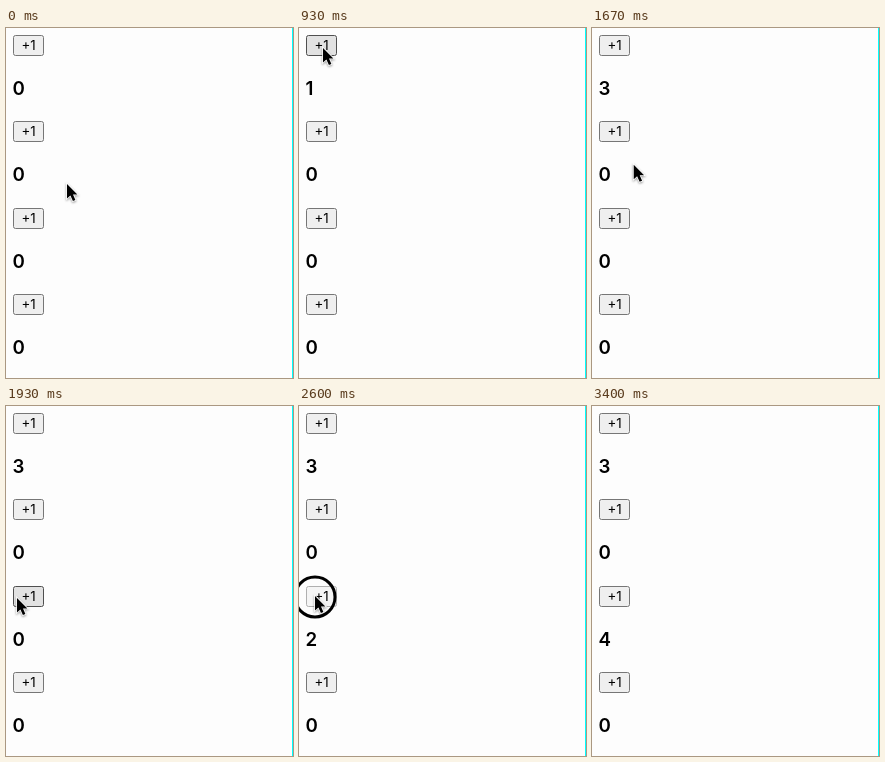
Recreate the animation shown at these times as an HTML page. Size 287x350 px, loop 3.54 s.

```html
<!DOCTYPE html>
<html lang="en">
<head>
<meta charset="utf-8">
<title>Counters</title>
<style>
  html, body { margin: 0; width: 100%; height: 100%; overflow: hidden; background: #fdfdfd; }
  svg { display: block; width: 287px; height: 350px; font-family: Inter, Roboto, sans-serif; }
  .button rect { fill: #efefef; stroke: #767676; }
  .button.hover rect { fill: #e2e2e2; stroke: #4f4f4f; }
  .button.active rect { fill: #f5f5f5; stroke: #b0b0b0; }
  .button text { font-size: 13.33px; text-anchor: middle; }
  .count { font-size: 18.72px; font-weight: 600; }
  #ring { fill: none; stroke: #000; stroke-width: 3; }
  #cursor { filter: drop-shadow(0.5px 1px 1px rgba(0, 0, 0, .4)); }
</style>
</head>
<body>
<svg viewBox="0 0 287 350">
  <rect x="286" width="1" height="350" fill="#0ff"/>
  <g id="rows"></g>
  <circle id="ring" r="20"/>
  <path id="cursor" d="M0 0V14.5L3.4 11.4L5.9 17L8.4 16L6 10.4H10.4Z"
    stroke="#fff" stroke-width="1.6" paint-order="stroke"/>
</svg>
<script>
const LOOP = 3540, STEP = 200 / 3;
const tops = [7, 93, 180, 266];
const $ = id => document.getElementById(id);

$("rows").innerHTML = tops.map(y => `
  <g class="button">
    <rect x="7.5" y="${y + .5}" width="30" height="20" rx="2"/>
    <text x="22.5" y="${y + 15}">+1</text>
  </g>
  <text class="count" x="6.5" y="${y + 60}">0</text>`).join("");
const buttons = [...document.querySelectorAll(".button")];
const counts = [...document.querySelectorAll(".count")];

const smooth = u => u * u * (3 - 2 * u);
const slowDown = u => u * (2 - u);
const steady = u => u;

// Cursor strokes: first step, last step, easing, then start, control and end points
const strokes = [
  [0, 7, smooth, [61, 156], [20, 100], [27, 30]],
  [8, 11, slowDown, [27, 30], [25, 25], [24, 20]],
  [23, 29, slowDown, [24, 20], [68, 149], [11, 192]],
  [30, 32, steady, [11, 192], [13, 191], [16, 190]],
  [48, 51, steady, [16, 190], [206, 105], [397, 21]]
];
// Each press lasts one step and counts on release: step, button
const presses = [[13, 0], [18, 0], [21, 0], [34, 2], [37, 2], [39, 2], [42, 2]];

function cursorAt(step) {
  const [first, last, ease, a, b, c] = strokes.findLast(s => step >= s[0]);
  const t = ease(Math.min(1, (step - first) / (last - first)));
  return a.map((p, i) => (1 - t) ** 2 * p + 2 * t * (1 - t) * b[i] + t * t * c[i]);
}

function stepAt(ms) {
  const step = Math.floor((ms + 4) / STEP);
  return Math.round(step * STEP / 10) * 10 > ms ? step - 1 : step;
}

function draw(ms) {
  const step = stepAt(ms);
  const [x, y] = cursorAt(step);
  const press = presses.find(p => p[0] === step);
  tops.forEach((top, i) => {
    const hover = x >= 7 && x < 38 && y >= top && y < top + 21;
    buttons[i].classList.toggle("hover", hover);
    buttons[i].classList.toggle("active", !!press && press[1] === i);
    counts[i].textContent = presses.filter(p => p[1] === i && p[0] < step).length;
  });
  $("cursor").setAttribute("transform", `translate(${x} ${y})`);
  $("ring").setAttribute("transform", `translate(${x} ${y + 1})`);
  $("ring").style.display = press ? "" : "none";
}

const start = performance.now();
function tick() {
  draw((performance.now() - start) % LOOP);
  requestAnimationFrame(tick);
}
tick();
</script>
</body>
</html>
```
